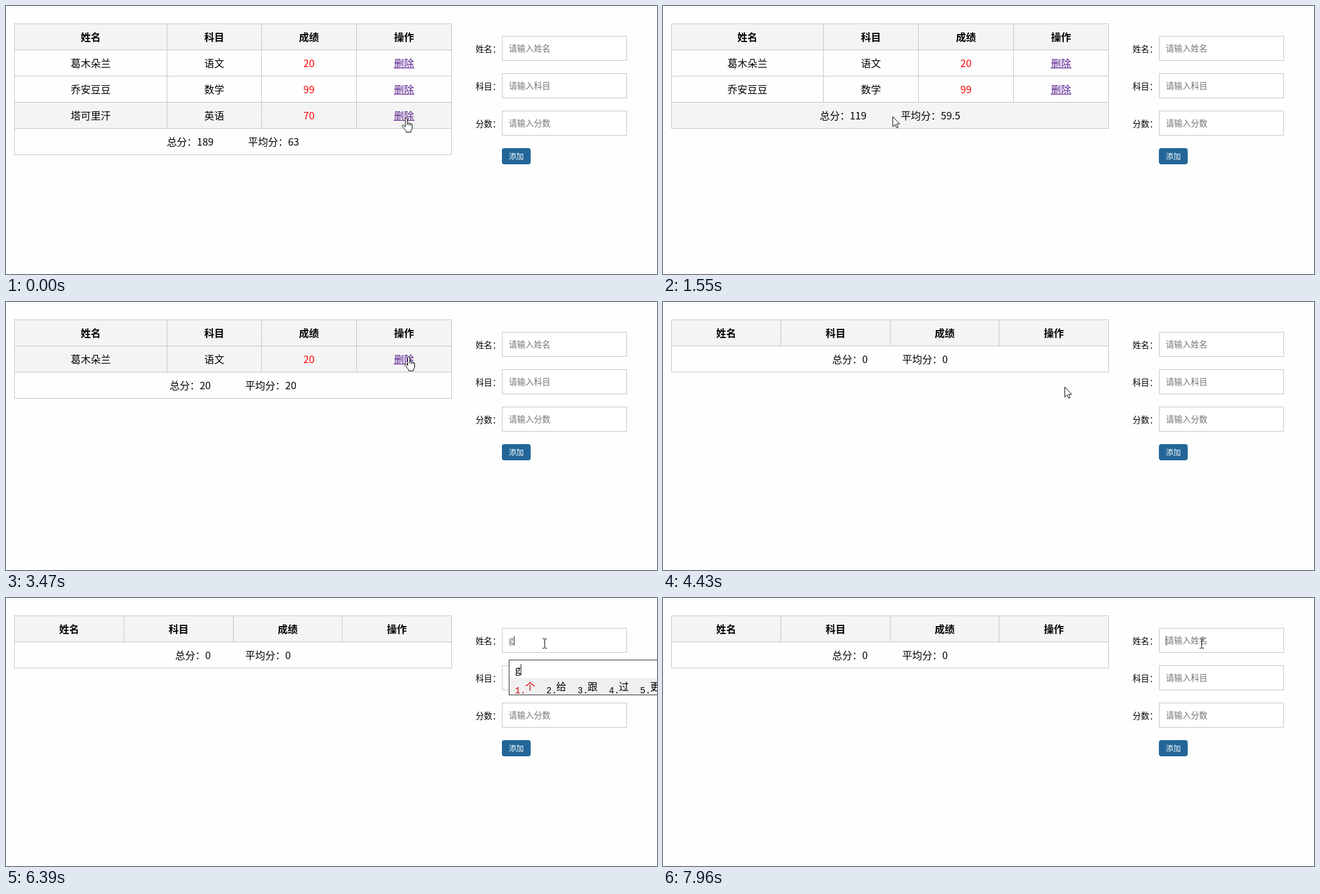
Write an HTML page that moves like this. It is 1041 px wide and 430 px high and loops after 8 s.

```html
<!DOCTYPE html>
<html lang="zh-CN">
<head>
<meta charset="utf-8">
<title>成绩表</title>
<style>
  html, body { margin: 0; width: 100%; height: 100%; overflow: hidden; background: #fefefe; }
  svg { display: block; font: 16px "Noto Sans CJK SC", "Noto Sans CJK", sans-serif; }
  text { white-space: pre; }
  .mid { text-anchor: middle; }
  .head { font-weight: bold; }
  .score { fill: #f00; }
  .link { fill: #551a8b; }
  .pressed { fill: #f00; }
  .field { font-size: 13.333px; }
  .hint { fill: #757575; }
  .typed { fill: #666; }
  .button { font-size: 12px; fill: #fff; }
  .index { font: 14px "Liberation Mono", monospace; }
  .first { fill: #c00; }
  .cursor { fill: #fff; stroke: #111; stroke-linejoin: round; }
</style>
</head>
<body>
<svg id="stage" width="1041" height="430" viewBox="0 0 1041 430"></svg>
<script>
const LOOP = 8000;
const ROW = 42, TOP = 28, LEFT = 13, RIGHT = 712;
const FIELD_X = 804;
const stage = document.getElementById('stage');
const pen = document.createElement('canvas').getContext('2d');

const records = [
  ['葛木朵兰', '语文', 20],
  ['乔安豆豆', '数学', 99],
  ['塔可里汗', '英语', 70],
];
// inner column borders by number of records
const columns = [[188, 363, 537], [257, 408, 560], [256, 408, 560], [257, 408, 560]];

// [start, records left, link pressed]
const tableSteps = [
  [0, 3], [370, 3, true], [510, 2], [2200, 2, true], [2320, 1], [4280, 1, true], [4430, 0],
];

// [start, shape, x, y] of the cursor's top left corner
const cursorSteps = [
  [0, 'hand', 633, 179],
  [510, 'arrow', 637, 186], [630, 'arrow', 630, 240], [750, 'arrow', 623, 277],
  [900, 'arrow', 623, 278], [1150, 'arrow', 599, 268], [1300, 'arrow', 307, 170],
  [1550, 'arrow', 367, 177], [1690, 'arrow', 450, 180], [1810, 'arrow', 550, 165],
  [1930, 'arrow', 614, 139], [2080, 'hand', 632, 134], [2320, 'arrow', 637, 139],
  [2470, 'arrow', 639, 145], [2590, 'arrow', 641, 148], [2710, 'arrow', 641, 146],
  [2830, 'arrow', 640, 138], [2950, 'arrow', 639, 122], [3070, 'hand', 633, 97],
  [3190, 'hand', 635, 90], [3470, 'hand', 637, 87],
  [4430, 'arrow', 642, 136], [4550, 'arrow', 630, 175], [4670, 'arrow', 613, 213],
  [5090, 'beam', 818, 132], [5230, 'beam', 838, 135], [5350, 'beam', 877, 80],
  [5470, 'beam', 858, 65],
];

// [start, caret shown, committed text, composing text, candidates]
const typingSteps = [
  [0, false, '', ''], [5590, true, '', ''], [6090, false, '', ''],
  [6390, true, '', 'g', '个 给 跟 过 更'],
  [6670, true, '', 'ge', '个 各 葛 歌 格'],
  [6970, true, '', 'gemu', '葛木 个 各 歌 格'],
  [7090, true, '葛木', ''],
  [7340, true, '葛木', 'd', '的 都 到 大 得'],
  [7590, true, '葛木', ''], [7710, true, '葛', ''], [7960, true, '', ''],
];

const shapes = {
  arrow: '<path d="M.5.5V16.5L4.2 13 6.6 18.5 9 17.5 6.6 12.2H11.5Z"/>',
  hand: `<path d="M5.5 15V2.2a1.6 1.6 0 0 1 3.2 0V8.6q1.3-1.4 2.7.6 1.5-1 2.6.8
    2.5-.6 2.5 2V17q0 2-2 4v2.5H6.8V21.5L1 14.4C-.2 12.4 2 11.2 3.3 12.4Z"/>
    <path fill="none" d="M8.7 8.5V12M11.4 9.2V12.5M14 10V13"/>`,
  beam: '<path fill="none" d="M0 .5H3M4 .5H7M3.5 1V15M0 15.5H3M4 15.5H7"/>',
};

const rect = (x, y, w, h, fill, more = '') =>
  `<rect x="${x}" y="${y}" width="${w}" height="${h}" fill="${fill}" ${more}/>`;
const text = (x, y, content, cls = '') => `<text x="${x}" y="${y}" class="${cls}">${content}</text>`;
const stepAt = (steps, t) => steps.findLast(step => step[0] <= t);
const textWidth = (content, size) => {
  pen.font = `${size}px "Noto Sans CJK SC", "Noto Sans CJK", sans-serif`;
  return pen.measureText(content).width;
};
const caret = (x, y, h) => rect(Math.round(x), y, 1, h, '#222');

function drawTable([, count, pressed], [, shape, x, y]) {
  const line = '#c8c8c8';
  const rows = records.slice(0, count);
  const edges = [LEFT, ...columns[count], RIGHT];
  const centre = i => (edges[i] + edges[i + 1] + 1) / 2;
  const last = count + 1;
  const bottom = TOP + ROW * (last + 1);
  const tipX = shape === 'hand' ? x + 5 : x;
  const hovered = tipX > LEFT && tipX < RIGHT ? Math.floor((y - TOP) / ROW) : -1;
  const width = RIGHT - LEFT + 1;

  let out = rect(LEFT, TOP, width, ROW, '#f4f4f4');
  if (hovered > 0 && hovered <= last) out += rect(LEFT, TOP + ROW * hovered, width, ROW, '#f4f4f4');
  for (let i = 0; i <= last + 1; i++) out += rect(LEFT, TOP + ROW * i, width, 1, line);
  edges.forEach((edge, i) => {
    const outer = i === 0 || i === edges.length - 1;
    out += rect(edge, TOP, 1, (outer ? bottom : bottom - ROW) - TOP + 1, line);
  });

  ['姓名', '科目', '成绩', '操作'].forEach((title, i) => {
    out += text(centre(i), TOP + 28, title, 'mid head');
  });
  rows.forEach(([name, subject, score], i) => {
    const top = TOP + ROW * (i + 1);
    const link = pressed && i === count - 1 ? 'pressed' : 'link';
    out += text(centre(0), top + 28, name, 'mid') + text(centre(1), top + 28, subject, 'mid')
      + text(centre(2), top + 28, score, 'mid score') + text(centre(3), top + 28, '删除', 'mid ' + link)
      + rect(620, top + 29, 33, 1, '', `class="${link}"`);
  });

  const total = rows.reduce((sum, row) => sum + row[2], 0);
  const average = count ? total / count : 0;
  return out + text(363, TOP + ROW * last + 28,
    `总分：${total}<tspan dx="55">平均分：${average}</tspan>`, 'mid');
}

function drawForm([, showCaret, committed, composing]) {
  const value = committed + composing;
  let out = '';
  ['姓名', '科目', '分数'].forEach((label, i) => {
    const y = 48 + 60 * i;
    const filled = i === 0 && value;
    out += text(751, y + 26, label + '：', 'field')
      + rect(793.5, y + 0.5, 199, 39, '#fff', 'stroke="#c8c8c8"')
      + text(FIELD_X, y + 25, filled ? value : '请输入' + label, 'field ' + (filled ? 'typed' : 'hint'));
  });
  if (showCaret) out += caret(FIELD_X + textWidth(value, 13.333), 61, 15);
  return out + rect(793, 228, 46, 26, '#226699', 'rx="4"') + text(804, 246, '添加', 'button');
}

function drawCandidates([, , committed, composing, candidates]) {
  if (!composing) return '';
  const x = FIELD_X + Math.round(textWidth(committed, 13.333));
  const y = committed ? 100 : 99;
  let out = rect(x + 0.5, y + 0.5, 400, 56, '#fff', 'stroke="#333"')
    + rect(x + 1, y + 29, 399, 27, '#f0f0f0')
    + text(x + 10, y + 22, composing)
    + caret(x + 10 + textWidth(composing, 16), y + 7, 18);
  let at = x + 10;
  candidates.split(' ').forEach((word, i) => {
    const tone = i ? '' : ' first';
    out += text(at, y + 54, i + 1 + '.', 'index' + tone) + text(at + 16, y + 49, word, tone);
    at += 34 + 16 * word.length;
  });
  return out;
}

const drawCursor = ([, shape, x, y]) =>
  `<g class="cursor" transform="translate(${x} ${y})">${shapes[shape]}</g>`;

let shown = '';
function tick() {
  const t = performance.now() % LOOP;
  const table = stepAt(tableSteps, t);
  const cursor = stepAt(cursorSteps, t);
  const typing = stepAt(typingSteps, t);
  const key = [table[0], cursor[0], typing[0]].join();
  if (key !== shown) {
    shown = key;
    stage.innerHTML = drawTable(table, cursor) + drawForm(typing) + drawCandidates(typing) + drawCursor(cursor);
  }
  requestAnimationFrame(tick);
}
tick();
</script>
</body>
</html>
```
